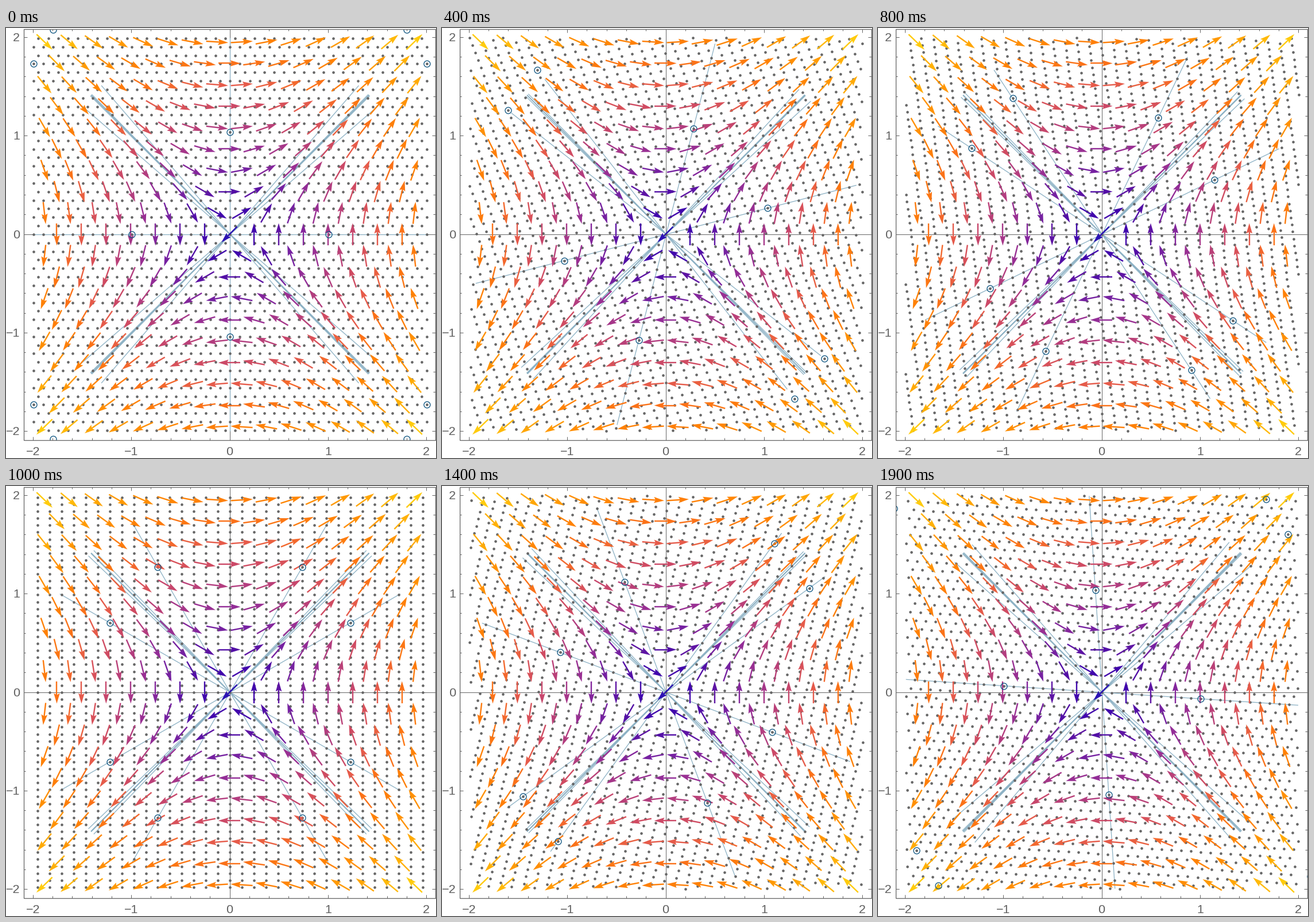
Write a matplotlib script that moves like this. It is 749 by 748 pixels and loops after 2000 ms.

```python
import numpy as np
import matplotlib.pyplot as plt
from matplotlib.animation import FuncAnimation
from matplotlib.collections import LineCollection, PolyCollection
from matplotlib.colors import LinearSegmentedColormap
from matplotlib.patches import Rectangle

W, H, DPI = 749, 748, 100
PX = 72 / DPI                      # points per pixel
LEFT, RIGHT, TOP, BOTTOM = 30.5, 747.5, 1.5, 716.5
# origin x, origin y and pixels per unit of each layer
AXES = (389.5, 358.5, 171.4)
FIELD = (389.1, 359.0, 171.8)
LATTICE = (390.3, 358.9, 171.2)
FRAMES, INTERVAL = 20, 100
PERIOD = np.arccosh(2)             # rapidity that maps the lattice to itself
GRAY = "#666666"

plt.rcParams["font.family"] = "Liberation Sans"
fig = plt.figure(figsize=(W / DPI, H / DPI), dpi=DPI, facecolor="white")
ax = fig.add_axes([0, 0, 1, 1])
ax.set_xlim(0, W)
ax.set_ylim(H, 0)
ax.axis("off")


def to_px(x, y, layer):
    cx, cy, unit = layer
    return cx + unit * np.asarray(x), cy - unit * np.asarray(y)


def boost(x, y, eta):
    c, s = np.cosh(eta), np.sinh(eta)
    return c * x + s * y, s * x + c * y


def tri_lattice(step, xmax, ymax):
    """Points of a triangular lattice inside a centred box."""
    rows = int(ymax / (step * np.sqrt(3) / 2))
    cols = int(xmax / step) + 1
    j, i = np.mgrid[-rows:rows + 1, -cols:cols + 1]
    x = (i + (j % 2) / 2) * step
    y = j * step * np.sqrt(3) / 2
    keep = np.abs(x) <= xmax + 1e-9
    return x[keep], y[keep]


def draw_frame():
    cx, cy, _ = AXES
    line = dict(color=GRAY, lw=PX, zorder=1)
    ax.plot([LEFT, RIGHT], [cy, cy], **line)
    ax.plot([cx, cx], [TOP, BOTTOM], **line)
    ax.add_patch(Rectangle((LEFT, TOP), RIGHT - LEFT, BOTTOM - TOP, fill=False,
                           ec=GRAY, lw=1.3 * PX, zorder=7))
    ticks = []
    for n in range(-10, 11):
        size = 6 if n % 5 == 0 else 3.5
        x, y = to_px(n / 5, n / 5, AXES)
        ticks += [[(x, BOTTOM), (x, BOTTOM - size)], [(x, TOP), (x, TOP + size)],
                  [(LEFT, y), (LEFT + size, y)], [(RIGHT, y), (RIGHT - size, y)]]
    ax.add_collection(LineCollection(ticks, colors=GRAY, linewidths=PX, zorder=7))
    style = dict(color="#606060", fontsize=21.5 * PX, va="baseline")
    for n in range(-2, 3):
        label = str(n).replace("-", "\u2212")
        x, y = to_px(n, n, AXES)
        ax.text(x, 743, label, ha="center", **style)
        ax.text(24, y + 7, label, ha="right", **style)


def draw_arrows():
    cmap = LinearSegmentedColormap.from_list("field", [
        (0.00, "#2c12b4"), (0.09, "#4106ac"), (0.16, "#540fa6"),
        (0.24, "#7520a1"), (0.32, "#942d97"), (0.40, "#b23c80"),
        (0.48, "#cd4966"), (0.56, "#e65b4a"), (0.64, "#fb7119"),
        (0.74, "#ff8204"), (0.85, "#ff9c02"), (1.00, "#ffcb0c")])
    x, y = tri_lattice(0.25, 1.9, 1.96)
    r = np.hypot(x, y)
    colors = cmap(r / r.max())
    zero = r < 1e-9
    ux = np.where(zero, -1, y) / np.where(zero, np.sqrt(2), r)
    uy = np.where(zero, -1, x) / np.where(zero, np.sqrt(2), r)
    px, py = to_px(x, y, FIELD)

    def place(along, across):
        return np.stack([px + along * ux + across * uy,
                         py - along * uy + across * ux], axis=1)

    shafts = np.stack([place(-19, 0), place(8, 0)], axis=1)
    heads = np.stack([place(19.5, 0), place(1.5, 5.3),
                      place(4.5, 0), place(1.5, -5.3)], axis=1)
    ax.add_collection(LineCollection(shafts, colors=colors, linewidths=2.4 * PX, zorder=4))
    ax.add_collection(PolyCollection(heads, facecolors=colors, edgecolors="none", zorder=5))


draw_frame()
draw_arrows()

lat_x, lat_y = tri_lattice(0.1, 8, 8)
turns = PERIOD * np.arange(-4, 5)

rays = LineCollection([], colors="#8db2c5", linewidths=1.3 * PX, zorder=2)
ax.add_collection(rays)
dots, = ax.plot([], [], "o", color=GRAY, ms=4.6 * PX, mew=0, zorder=3, snap=False)
rings, = ax.plot([], [], "o", mfc="none", mec="#0c5480", ms=11 * PX,
                 mew=1.3 * PX, zorder=6, snap=False)
clip = Rectangle((LEFT, TOP), RIGHT - LEFT, BOTTOM - TOP, transform=ax.transData)
rings.set_clip_path(clip)


def update(frame):
    eta = PERIOD * frame / FRAMES

    x, y = boost(lat_x, lat_y, eta)
    inside = (np.abs(x) <= 2 + 1e-9) & (np.abs(y) <= 2 + 1e-9)
    dots.set_data(*to_px(x[inside], y[inside], LATTICE))

    # orbits of the two starting points and of their mirror images
    ex, ey = boost(np.array([1, 0])[:, None],
                   np.array([0, 0.6 * np.sqrt(3)])[:, None], eta + turns)
    ex, ey = ex.ravel(), ey.ravel()
    near = (np.abs(ex) < 2.3) & (np.abs(ey) < 2.3)
    rings.set_data(*to_px(np.r_[ex[near], -ex[near]],
                          np.r_[ey[near], -ey[near]], LATTICE))

    k = 2 / np.hypot(ex, ey)
    ends = [np.stack(to_px(s * k * ex, s * k * ey, LATTICE), axis=1) for s in (-1, 1)]
    rays.set_segments(np.stack(ends, axis=1))
    return rays, dots, rings


anim = FuncAnimation(fig, update, frames=FRAMES, interval=INTERVAL,
                     repeat=True, repeat_delay=0, blit=False)
plt.show()
```
